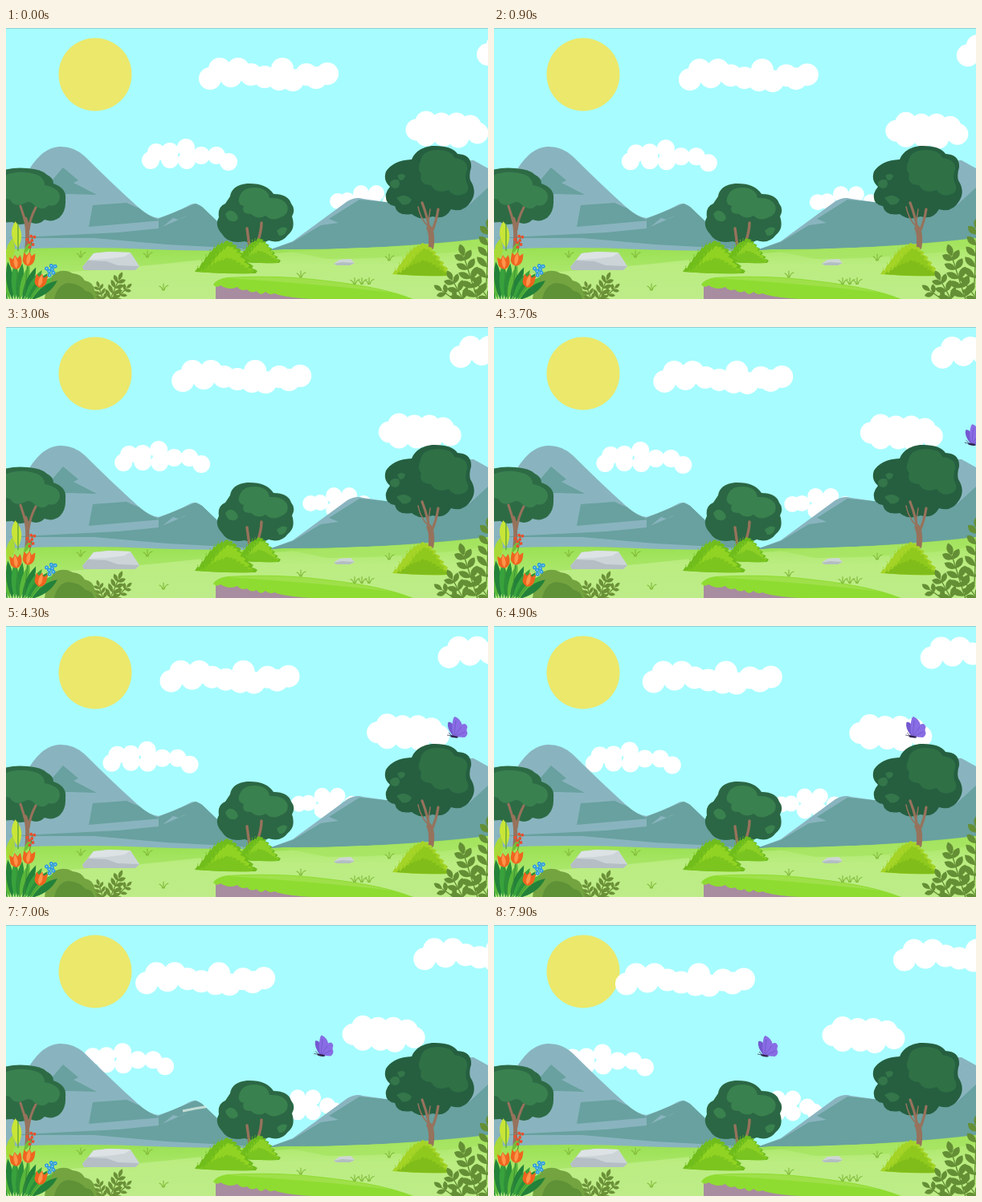
Recreate the animation shown at these times as an HTML page. Size 600 px wide and 338 px high, loop 8000 ms.

```html
<!DOCTYPE html>
<html lang="en">
<head>
<meta charset="utf-8">
<title>Meadow</title>
<style>
html, body { margin: 0; width: 100%; height: 100%; overflow: hidden; background: #a7fcff; }
svg { display: block; width: 100vw; height: 100vh; }
.far { fill: #89b4bf; }
.facet { fill: #68a19f; }
.trunk { fill: none; stroke: #97725c; stroke-linecap: round; }
.tuft { fill: none; stroke: #83bd3c; stroke-width: 1.2; stroke-linecap: round; }
</style>
</head>
<body>
<svg viewBox="0 0 600 338" preserveAspectRatio="none">
  <defs>
    <linearGradient id="meadow" x1="0" y1="0" x2="0" y2="1">
      <stop offset="0" stop-color="#94df4b"/>
      <stop offset=".5" stop-color="#a9e668"/>
      <stop offset="1" stop-color="#b9eb82"/>
    </linearGradient>
    <linearGradient id="slope" x1="0" y1="0" x2="0" y2="1">
      <stop offset="0" stop-color="#a5e55f"/>
      <stop offset=".45" stop-color="#bbed82"/>
      <stop offset="1" stop-color="#bdec88"/>
    </linearGradient>
  </defs>

  <rect width="600" height="338" fill="#a7fcff"/>
  <rect width="600" height="1" fill="#8fcfd2"/>
  <circle cx="111" cy="58" r="45.5" fill="#ebe86b"/>
  <g id="clouds" fill="#fff"></g>

  <!-- mountains -->
  <path class="far" d="M0 198L29 176Q46 149 66 148Q84 147 98 160Q132 194 163 222Q178 236 190 237Q212 230 228 221Q236 216 244 223L266 244L300 266V278H0Z"/>
  <path class="facet" d="M71 174L38 213Q55 209 77 207L113 208L84 193L90 190Z"/>
  <path class="facet" d="M108 221L150 218L166 225Q180 237 194 240L160 243L103 248Z"/>
  <path class="facet" d="M0 262L140 255L190 250L222 236L236 219L244 223L266 244L310 268V276L200 270L110 262Z"/>
  <path class="facet" d="M190 238L236 219L228 232L215 239L208 237L190 252Z"/>
  <path class="far" d="M330 276L357 266L425 216Q436 210 444 213L480 218L540 185Q570 164 582 165L600 175V280H330Z"/>
  <path class="facet" d="M330 276L357 267L392 246L414 243L402 238L440 214L480 218L520 225L575 222L600 199V280H330Z"/>

  <!-- ground -->
  <path fill="url(#meadow)" d="M0 276Q100 272 180 276Q300 280 345 276Q460 277 600 263V338H0Z"/>
  <path fill="url(#slope)" d="M0 309Q130 302 225 291Q350 279 420 275Q520 273 600 262V338H0Z"/>
  <path fill="#a3e45c" d="M345 277Q460 277 600 262V274Q500 288 400 288Z" opacity=".65"/>
  <path fill="#a88c9f" d="M261 318V338H430Q380 324 300 316Z"/>
  <path fill="#8edc31" d="M258 320Q262 313 276 311Q340 307 400 315Q470 323 507 338H385Q350 337 334 331Q328 334 323 329Q317 335 312 328Q305 332 300 326Q293 329 288 323Q278 328 267 321Q262 325 258 320Z"/>
  <path fill="#9fe04a" d="M276 312Q340 308 400 316Q450 322 480 330Q400 320 276 312Z"/>
  <g id="tufts"></g>

  <!-- rocks -->
  <path fill="#ccd4d8" d="M95 298L109 281L128 279L155 280L166 297L161 302L97 302Z"/>
  <path fill="#b4bec4" d="M95 298L102 290L125 291L139 296L166 297L161 302L97 302Z"/>
  <path fill="#dde3e5" d="M109 281L128 279L155 280L148 285L126 288L103 289Z"/>
  <path fill="#cdd6d6" d="M408 294L415 289L429 288L434 293L428 296L412 296Z"/>
  <path fill="#b3bec1" d="M408 294L418 292L434 293L428 296L412 296Z"/>

  <!-- left tree -->
  <path fill="#2d6b45" d="M-5 178Q10 173 27 175Q44 176 51 183Q59 187 59 194Q76 200 74 214Q75 228 67 236Q58 243 48 239Q40 247 30 242Q16 248 8 242L-5 243Z"/>
  <path fill="#3a8150" d="M-5 186Q10 177 31 181Q48 184 48 196Q68 200 67 212Q64 224 53 221Q46 229 36 222Q30 214 22 219Q10 224 5 214L-5 212Z"/>
  <path class="trunk" stroke-width="5" d="M26 274Q28 250 24 238"/>
  <path class="trunk" stroke-width="3" d="M25 244L18 222M28 252Q30 237 37 224"/>

  <!-- middle tree -->
  <path fill="#2b6744" d="M279 210Q281 196 300 194Q324 193 333 207Q351 207 355 219Q361 226 356 235Q361 250 351 258Q342 270 327 265Q311 272 297 266Q276 270 269 257Q259 246 265 236Q263 223 273 219Z"/>
  <path fill="#39814e" d="M290 212Q294 198 311 199Q326 200 328 212Q345 211 350 221Q353 232 342 236Q332 242 323 234Q314 240 305 232Q292 232 296 222Q288 220 290 212Z"/>
  <path fill="#39814e" d="M273 232Q279 224 286 231Q292 238 285 241Q276 243 273 232ZM337 253Q344 246 350 250Q348 260 340 259Z"/>
  <path class="trunk" stroke-width="3.4" d="M303 272L300 250M312 270Q318 255 318 243"/>

  <!-- right tree -->
  <path fill="#255f40" d="M505 164Q510 150 530 147Q555 146 562 157Q580 158 579 174Q576 183 578 190Q587 204 579 216Q570 231 554 226Q546 240 531 235Q516 241 505 232Q487 235 484 222Q471 220 473 207Q475 201 478 198Q469 190 473 179Q482 165 505 164Z"/>
  <path fill="#2f7145" d="M516 166Q518 153 536 152Q555 152 558 162Q576 164 574 177Q571 185 573 192Q579 203 570 207Q558 212 551 202Q536 208 529 196Q513 195 517 182Q511 177 516 166Z"/>
  <path fill="#34764a" d="M478 193Q482 187 489 190Q492 198 485 200Q478 200 478 193ZM487 184Q493 180 497 184Q496 190 490 190ZM486 212Q496 205 505 214Q502 222 493 220Z"/>
  <path class="trunk" stroke-width="7" d="M529 273Q531 258 527 250"/>
  <path class="trunk" stroke-width="3.2" d="M527 252Q525 236 518 218M530 254Q536 240 538 226"/>
  <path class="trunk" stroke-width="1.5" d="M525 247Q516 238 513 223M526 240L528 226"/>

  <g id="bushes"></g>

  <!-- corner plants -->
  <path fill="#73a43f" d="M48 338Q52 311 62 305Q73 300 83 306Q94 307 98 315Q109 317 110 327Q117 332 116 338Z"/>
  <path fill="#5f9137" d="M60 338Q64 320 77 318Q92 319 99 328Q108 329 110 338Z"/>
  <g id="plants"></g>
  <g id="flowers"></g>

  <path id="wind" d="M604 204Q540 218 475 227Q400 237 330 228Q270 220 220 232" fill="none" stroke="#eef7ef" stroke-opacity=".68" stroke-width="3"/>
  <g id="butterfly">
    <g id="wings">
      <path fill="#7459d0" d="M-6 10Q-14 0-12-7Q-8-8-5-3Q0 4 1 11Z"/>
      <path fill="#886de4" d="M-5 10Q-8 0-6-8Q-5-14-3-14Q4-11 6-4Q11-7 13-1Q11 3 13 6Q13 10 9 12Q3 12-5 10Z"/>
      <path fill="none" stroke="#6b50c7" stroke-width=".7" d="M-4 9L-2-9M-3 9L5-1M-2 10L10 5"/>
    </g>
    <path fill="none" stroke="#332653" stroke-width=".7" d="M-7 10L-13 9M-7 10L-11 6"/>
    <ellipse cx="-4" cy="11" rx="5" ry="1.3" fill="#332653" transform="rotate(10 -4 11)"/>
  </g>
</svg>
<script>
const LOOP = 8000, STEP = 100;
const $ = id => document.getElementById(id);

function add(parent, tag, attrs) {
  const el = document.createElementNS('http://www.w3.org/2000/svg', tag);
  for (const key in attrs) el.setAttribute(key, attrs[key]);
  return $(parent).appendChild(el);
}

const dot = (parent, cx, cy, r, fill) => add(parent, 'circle', { cx, cy, r, fill });

// A cloud is a heap of round puffs of one size, given by their centres.
function cloud(x, y, r, puffs) {
  for (const [dx, dy] of puffs) dot('clouds', x + dx, y + dy, r, '#fff');
}
const long = [[0,0],[12,-12],[35,-12],[26,-3],[51,-5],[68,-2],[90,-12],[86,1],[103,2],[120,-5],[132,-1],[146,-6]];
cloud(254, 63, 14, long);
cloud(600, 33, 14, long);
cloud(180, 165, 11, [[0,0],[7,-10],[24,-11],[24,-1],[44,-16],[45,0],[63,-6],[82,-6],[97,2]]);
cloud(511, 127, 13.5, [[0,0],[12,-10],[12,7],[31,-8],[34,7],[50,-8],[52,9],[67,-5],[76,4]]);
cloud(413, 216, 10, [[0,0],[12,-1],[29,-10],[48,-10],[66,0],[75,6],[29,8],[48,8],[38,0]]);

function tuft(x, y) {
  add('tufts', 'path', { class: 'tuft', d: `M${x - 1} ${y}q-1-4-4-5m5 5v-8m1 8q1-5 5-6` });
}
tuft(176, 286);
tuft(196, 327);
tuft(367, 311);
tuft(477, 290);
tuft(93, 286);
for (let i = 0; i < 3; i++) tuft(434 + 9 * i, 319.5);

// A mound with a fringe of leaf tips along its top.
function mound(x, base, w, h, n, fill) {
  let d = `M${x - w} ${base}`;
  for (let i = 1; i <= n; i++) {
    const p = i / n, rise = h * Math.sin(Math.PI * p) ** 1.15;
    const px = x - w + 2 * w * p, py = base - rise;
    const side = p < .5 ? -1 : 1;
    d += `Q${px - side * 2} ${py - 4} ${px + side * 2} ${py - 1}L${px} ${py + 2}`;
  }
  add('bushes', 'path', { d: d + `Q${x} ${base + 3} ${x - w} ${base}Z`, fill });
}
function bush(x, base, w, h, dark, light, mid) {
  mound(x, base, w, h, 15, dark);
  mound(x + 4, base - .5, w * .76, h * .8, 12, light);
  mound(x, base, w * .86, h * .42, 13, mid);
}
bush(313, 291, 27, 27, '#6dbc1c', '#8dd126', '#79c420');
bush(273, 304, 38, 37, '#70bd1b', '#91d322', '#7cc51f');
bush(517, 307, 36, 37, '#a4d426', '#8fc91d', '#80bd1a');

function leaf(parent, x, y, angle, len, wide, fill) {
  add(parent, 'path', {
    d: `M0 0Q${len * .55} ${-wide} ${len} 0Q${len * .55} ${wide} 0 0Z`,
    transform: `translate(${x} ${y}) rotate(${angle})`, fill
  });
}

// A stem with pairs of leaves and one leaf at the tip.
function sprig(x0, y0, x1, y1, pairs, len, wide, fill) {
  const turn = Math.atan2(y1 - y0, x1 - x0) * 180 / Math.PI;
  add('plants', 'path', { d: `M${x0} ${y0}L${x1} ${y1}`, stroke: fill, 'stroke-width': 1.4 });
  for (let i = 0; i < pairs; i++) {
    const p = (i + .6) / pairs, x = x0 + (x1 - x0) * p, y = y0 + (y1 - y0) * p;
    for (const side of [-1, 1]) leaf('plants', x, y, turn + side * 48, len * (1.1 - .3 * p), wide, fill);
  }
  leaf('plants', x1, y1, turn, len * .9, wide, fill);
}
const olive = '#648f35', moss = '#6b9138';
sprig(128, 342, 140, 315, 4, 13, 5, moss);
sprig(122, 342, 116, 324, 3, 10, 4, moss);
sprig(132, 342, 150, 325, 3, 10, 4, moss);
sprig(588, 342, 570, 285, 5, 18, 8, olive);
sprig(598, 320, 601, 252, 5, 18, 8, olive);
sprig(572, 344, 556, 315, 3, 16, 7, olive);
sprig(566, 344, 543, 328, 2, 14, 6, olive);
sprig(604, 342, 586, 318, 3, 13, 6, olive);

// Flower clump
const greens = ['#2b8f3a', '#58b73a', '#23813a', '#38a23c'];
for (let i = 0; i < 11; i++)
  leaf('flowers', 2 + 3 * i, 339, -112 + 7.5 * i, 50 - i, 9, greens[i % 4]);
leaf('flowers', 15, 275, -96, 34, 12, '#c9e536');
leaf('flowers', 3, 292, -80, 30, 10, '#a9d936');
leaf('flowers', 22, 282, -60, 18, 5, '#74bf38');
add('flowers', 'path', {
  d: 'M15 243V278M13 300L17 338M27 296L22 338M43 320L30 338M26 300L33 260M45 325L57 298',
  fill: 'none', stroke: '#3c8f38'
});
for (let i = 0; i < 7; i++) {
  const a = i * 2.4, s = Math.sqrt((i + .3) / 7);
  dot('flowers', 31 + 6 * s * Math.cos(a), 265 + 9 * s * Math.sin(a), 2, '#e8502e');
  const x = 56 + 7 * s * Math.cos(a), y = 301 + 8 * s * Math.sin(a);
  dot('flowers', x, y, 2.5, '#2d9be0');
  dot('flowers', x, y, .8, '#bde8fa');
}
function tulip(x, y, turn) {
  const transform = `translate(${x} ${y}) rotate(${turn})`;
  add('flowers', 'path', { transform, fill: '#ef641f', d: 'M0 9Q-8 7-7-1L-7-7L-3-4L0-9L3-4L7-8Q10 7 0 9Z' });
  add('flowers', 'path', { transform, fill: '#ff964a', d: 'M0 8Q-5 2 0-8Q5 2 0 8Z' });
}
tulip(12, 292, -8);
tulip(28, 288, 10);
tulip(43, 315, 14);

const wind = $('wind'), windLen = wind.getTotalLength();
const clamp = v => Math.max(0, Math.min(1, v));

function drawWind(t) {
  const gust = [1700, 6100].find(s => t >= s && t < s + 1000);
  const age = t - gust;
  const head = clamp(age / 600) * windLen, tail = clamp((age - 300) / 650) * windLen;
  const shown = head > tail;
  wind.style.display = shown ? '' : 'none';
  if (shown) wind.setAttribute('stroke-dasharray', `0 ${tail} ${head - tail} ${windLen * 2}`);
}

function drawButterfly(t) {
  const u = (t - 4300) / 1000;
  const x = 562 - 61.4 * u;
  const y = 127 + u * (u - .6) * (6.07 - 2.21 * (u - 1.9));
  $('butterfly').style.display = x > 620 ? 'none' : '';
  $('butterfly').setAttribute('transform', `translate(${x} ${y})`);
  const flap = .93 + .07 * Math.cos(t * Math.PI / 300);
  $('wings').setAttribute('transform', `translate(-4 11) scale(${flap} 1) translate(4 -11)`);
}

const start = performance.now();
function frame(now) {
  const t = Math.floor(Math.max(0, now - start) % LOOP / STEP) * STEP;
  $('clouds').setAttribute('transform', `translate(${-.01127 * t} ${.00133 * t})`);
  drawWind(t);
  drawButterfly(t);
  requestAnimationFrame(frame);
}
frame(start);
</script>
</body>
</html>
```
